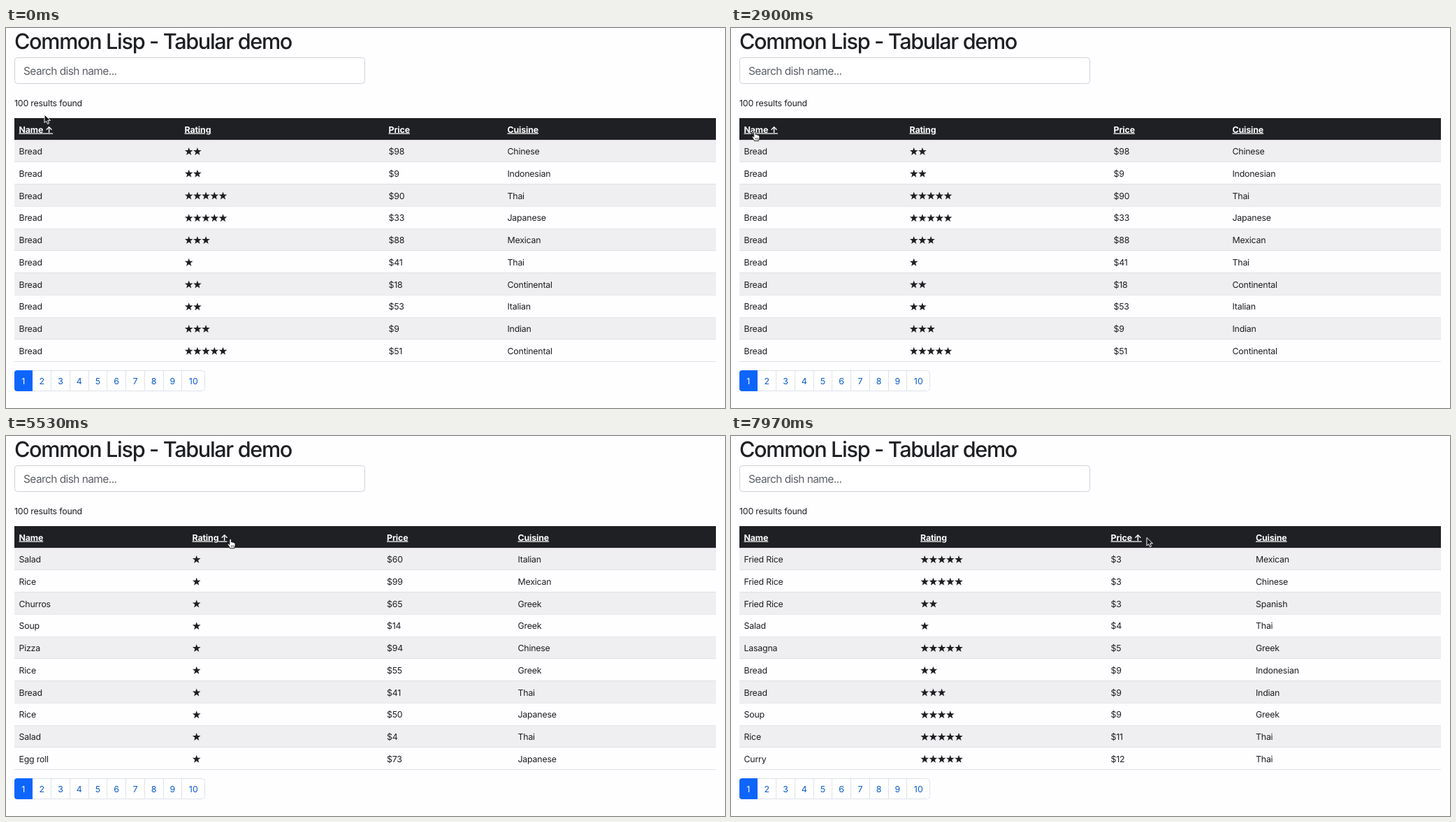
An HTML page that plays this animation: 1029x544 px, repeating every 8 s.

```html
<!DOCTYPE html>
<html lang="en">
<head>
<meta charset="utf-8">
<title>Tabular demo</title>
<style>
  html, body { margin: 0; width: 100%; height: 100%; overflow: hidden; background: #fefdff; }
  svg { display: block; width: 1029px; height: 544px; }
  text {
    font: 12.4px Inter, "Open Sans", sans-serif;
    font-optical-sizing: none;
    letter-spacing: -.018em;
    fill: #1d1f23;
    text-rendering: geometricPrecision;
  }
  .title { font-size: 30.6px; font-weight: 500; letter-spacing: -.043em; }
  .hint { font-size: 15.5px; letter-spacing: -.038em; fill: #5b5f64; }
  .head { font-weight: 700; letter-spacing: -.012em; fill: #fff; text-decoration: underline; }
  .page { fill: #0b5bd0; text-anchor: middle; letter-spacing: 0; }
  .page.on { fill: #fff; }
  .star { fill: #1d1f23; }
</style>
</head>
<body>
<svg id="stage" viewBox="0 0 1029 544">
  <text class="title" x="12" y="29.7">Common Lisp - Tabular demo</text>
  <rect x="12.5" y="42.5" width="501" height="37" rx="4" fill="#fff" stroke="#ced2d8"/>
  <text class="hint" x="25" y="66.7">Search dish name...</text>
  <text x="12" y="112">100 results found</text>
  <g id="grid"></g>
  <g id="views"></g>
  <g id="pages"></g>
  <g id="arrow">
    <path d="M0 0V11.6L2.7 9.1L4.5 13.3L6.6 12.4L4.8 8.3H8.5Z" fill="#111" stroke="#fff" stroke-width="1" stroke-linejoin="round"/>
  </g>
  <g id="hand">
    <path d="M-1.3 1.2Q0-.8 1.3 1.2V4.7Q2.6 4 3.4 5.1Q4.6 4.6 5.2 5.8Q6.6 5.5 6.8 7.2V9.5Q6.6 11.4 5.6 12.4V13.6H-.6Q-1.2 11.8-2.8 9.8L-4 7.9Q-4-6.2-4 7Q-3 6.2-1.3 8.2Z" fill="#fff" stroke="#111" stroke-width=".9" stroke-linejoin="round"/>
    <path d="M1.2 9V12M2.9 9V12M4.5 9V12" fill="none" stroke="#111" stroke-width=".6"/>
  </g>
</svg>
<script>
const NS = 'http://www.w3.org/2000/svg';
const LOOP = 8000, ROW = 31.75, TOP = 160.5;
const $ = id => document.getElementById(id);

function add(parent, tag, attrs, text) {
  const el = document.createElementNS(NS, tag);
  for (const k in attrs) el.setAttribute(k, attrs[k]);
  if (text !== undefined) el.textContent = text;
  return parent.appendChild(el);
}

// Each view: sorted column, arrow, column positions, rows of "name,stars,price,cuisine"
const VIEWS = {
  nameUp: { sort: 0, mark: '↑', cols: [18.5, 255.5, 547.5, 717.5], rows:
    'Bread,2,98,Chinese|Bread,2,9,Indonesian|Bread,5,90,Thai|Bread,5,33,Japanese|Bread,3,88,Mexican|' +
    'Bread,1,41,Thai|Bread,2,18,Continental|Bread,2,53,Italian|Bread,3,9,Indian|Bread,5,51,Continental' },
  nameDown: { sort: 0, mark: '↓', cols: [18.5, 267, 570, 748], rows:
    'Soup,1,14,Greek|Soup,4,9,Greek|Soup,3,62,Japanese|Soup,2,47,Thai|Soup,5,28,Mexican|' +
    'Soup,4,71,Italian|Soup,2,36,Chinese|Soup,3,84,Spanish|Salad,1,60,Italian|Salad,5,33,Mexican' },
  ratingDown: { sort: 1, mark: '↓', cols: [18.5, 291.5, 585.5, 757], rows:
    'Noodles,5,66,Spanish|Rice,5,73,Thai|Bread,5,90,Thai|Bread,5,33,Japanese|Roti,5,53,Italian|' +
    'Fried Rice,5,3,Mexican|Rice,5,90,Greek|Rice,5,100,Thai|Lasagna,5,35,Indian|Salad,5,33,Mexican' },
  ratingUp: { sort: 1, mark: '↑', cols: [18.5, 266.5, 545, 732.5], rows:
    'Salad,1,60,Italian|Rice,1,99,Mexican|Churros,1,65,Greek|Soup,1,14,Greek|Pizza,1,94,Chinese|' +
    'Rice,1,55,Greek|Bread,1,41,Thai|Rice,1,50,Japanese|Salad,1,4,Thai|Egg roll,1,73,Japanese' },
  priceDown: { sort: 2, mark: '↓', cols: [18.5, 252.5, 552.5, 782.5], rows:
    'Rice,5,100,Thai|Rice,1,99,Mexican|Bread,2,98,Chinese|Churros,3,97,Greek|Curry,2,95,Thai|' +
    'Pizza,1,94,Chinese|Salad,4,92,Indian|Bread,5,90,Thai|Rice,5,90,Greek|Bread,3,88,Mexican' },
  priceUp: { sort: 2, mark: '↑', cols: [18.5, 271, 543.5, 751], rows:
    'Fried Rice,5,3,Mexican|Fried Rice,5,3,Chinese|Fried Rice,2,3,Spanish|Salad,1,4,Thai|Lasagna,5,5,Greek|' +
    'Bread,2,9,Indonesian|Bread,3,9,Indian|Soup,4,9,Greek|Rice,5,11,Thai|Curry,5,12,Thai' }
};

const SHOWN = [[0, 'nameUp'], [2000, 'nameDown'], [2900, 'nameUp'], [4130, 'ratingDown'],
  [5230, 'ratingUp'], [6330, 'priceDown'], [7400, 'priceUp']];

// Cursor path: time, x, y, pointing hand
const PATH = [
  [0, 55, 124, 0], [30, 55, 124, 0], [200, 50, 140, 1], [370, 49, 147, 1],
  [1270, 49, 147, 1], [1430, 34, 148, 1],
  [3300, 34, 148, 1], [3370, 72, 152, 0], [3600, 328, 160, 0], [3700, 292, 147, 1], [3800, 283, 144, 1],
  [4070, 283, 144, 0], [4800, 283, 144, 0], [4900, 296, 145, 1], [5070, 315, 146, 1],
  [5500, 315, 146, 1], [5600, 335, 150, 0], [5900, 548, 149, 1], [6070, 566, 150, 1],
  [6930, 566, 150, 1], [7070, 576, 148, 1], [7920, 576, 148, 1], [7965, 595, 145.5, 0], [LOOP, 595, 145.5, 0]
];

const STAR = Array.from({ length: 10 }, (_, i) => {
  const r = i % 2 ? 2.5 : 6.1, a = (i / 5 - .5) * Math.PI;
  return [(r * Math.cos(a)).toFixed(2), (r * Math.sin(a)).toFixed(2)];
}).join(' ');

function drawGrid() {
  const g = $('grid');
  add(g, 'rect', { x: 12, y: 129, width: 1004, height: 31.3, fill: '#1e2024' });
  for (let i = 0; i < 10; i++) {
    const y = TOP + i * ROW;
    add(g, 'rect', { x: 12, y, width: 1004, height: ROW, fill: i % 2 ? '#fefdff' : '#efeef0' });
    add(g, 'rect', { x: 12, y: Math.round(y + ROW) - 1, width: 1004, height: 1, fill: '#dee1e5' });
  }
}

function drawView(view) {
  const g = add($('views'), 'g', { visibility: 'hidden' });
  const [nameX, starX, priceX, kindX] = view.cols;
  ['Name', 'Rating', 'Price', 'Cuisine'].forEach((label, i) =>
    add(g, 'text', { class: 'head', x: view.cols[i], y: 149.5 },
      i === view.sort ? label + ' ' + view.mark : label));
  view.rows.split('|').forEach((row, i) => {
    const [name, stars, price, kind] = row.split(',');
    const y = 181.2 + i * ROW;
    add(g, 'text', { x: nameX, y }, name);
    add(g, 'text', { x: priceX, y }, '$' + price);
    add(g, 'text', { x: kindX, y }, kind);
    for (let s = 0; s < +stars; s++)
      add(g, 'polygon', { class: 'star', points: STAR,
        transform: `translate(${starX + 6.2 + s * 12.2} ${y - 4.2})` });
  });
  return g;
}

function drawPages() {
  const g = $('pages');
  add(g, 'rect', { x: 12.5, y: 490.5, width: 272, height: 29, rx: 4, fill: '#fff', stroke: '#dee2e6' });
  add(g, 'path', { d: 'M38 490H16a4 4 0 0 0-4 4V516a4 4 0 0 0 4 4H38Z', fill: '#0d65fb' });
  for (let n = 1; n <= 10; n++) {
    const left = 11.3 + (n - 1) * 26.75;
    if (n > 2) add(g, 'rect', { x: Math.round(left - .7), y: 491, width: 1, height: 28, fill: '#dee2e6' });
    add(g, 'text', { class: n === 1 ? 'page on' : 'page', x: n === 10 ? 268.3 : 24.7 + (n - 1) * 26.7, y: 510.2 }, n);
  }
}

drawGrid();
drawPages();
const groups = {};
for (const key in VIEWS) groups[key] = drawView(VIEWS[key]);

const lastAt = (list, t) => list.findLastIndex(item => item[0] <= t);

function render(t) {
  const shown = SHOWN[lastAt(SHOWN, t)][1];
  for (const key in groups) groups[key].setAttribute('visibility', key === shown ? 'visible' : 'hidden');

  const i = lastAt(PATH, t), a = PATH[i], b = PATH[i + 1] || a;
  const k = b === a ? 0 : (t - a[0]) / (b[0] - a[0]);
  const x = a[1] + (b[1] - a[1]) * k, y = a[2] + (b[2] - a[2]) * k;
  ['arrow', 'hand'].forEach((id, kind) => {
    $(id).setAttribute('transform', `translate(${x} ${y})`);
    $(id).setAttribute('visibility', kind === a[3] ? 'visible' : 'hidden');
  });
}

const start = performance.now();
function tick() {
  render((performance.now() - start) % LOOP);
  requestAnimationFrame(tick);
}
tick();
</script>
</body>
</html>
```
